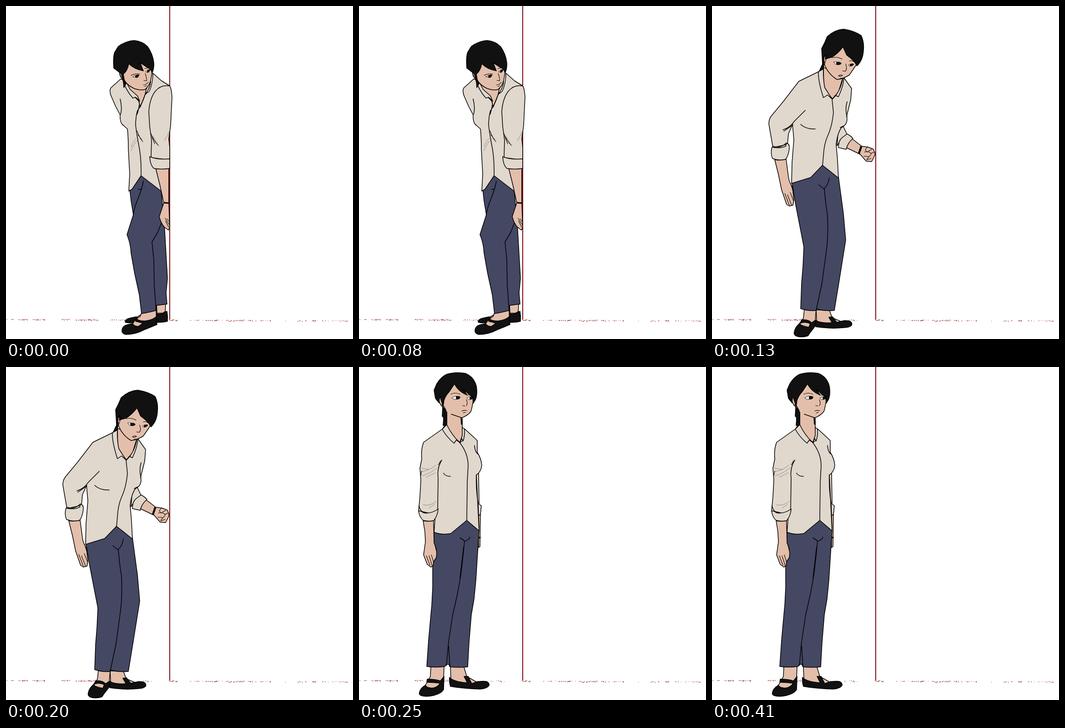
Animation of 763 by 734 pixels, one loop 0.51 s. Source, as an HTML page:

```html
<!DOCTYPE html>
<html lang="en">
<head>
<meta charset="utf-8">
<title>Leaning by the wall</title>
<style>
html, body { margin: 0; width: 100%; height: 100%; overflow: hidden; background: #fff; }
svg { display: block; width: 763px; height: 734px; }
path { stroke: #000; stroke-width: 1.5; stroke-linejoin: round; stroke-linecap: round; }
.shirt { fill: #e0d7cd; }
.pants { fill: #444863; }
.skin { fill: #e3bfab; }
.black { fill: #111; }
.white { fill: #fff; stroke-width: .8; }
.line { fill: none; }
.fine { fill: none; stroke-width: 1.1; }
.faint { fill: none; stroke-width: .6; stroke: #555; }
.band { fill: none; stroke-width: 3.2; stroke-linecap: butt; }
.wall { stroke: #800c12; stroke-width: 2; stroke-linecap: butt; }
#floor { fill: #96191c; stroke: none; }
.pose { visibility: hidden; animation: 510ms step-end infinite; }
#lean { animation-name: lean; }
#rise { animation-name: rise; }
#stand { animation-name: stand; }
@keyframes lean { 0% { visibility: visible; } 25.4902%, 100% { visibility: hidden; } }
@keyframes rise { 0% { visibility: hidden; } 25.4902% { visibility: visible; } 49.0196%, 100% { visibility: hidden; } }
@keyframes stand { 0% { visibility: hidden; } 49.0196%, 100% { visibility: visible; } }
</style>
</head>
<body>
<svg viewBox="0 0 763 734">
  <path id="floor" shape-rendering="crispEdges"/>
  <path class="wall" d="M360 0V691"/>

  <g id="lean" class="pose">
    <!-- feet -->
    <path class="skin" d="M331 657L332 677L350 677L351 656Z"/>
    <path class="black" d="M331 678Q340 681 349 674L354 673Q356 684 355 695Q344 698 331 697Z"/>
    <path class="skin" d="M284 688L296 681L299 688L288 694Z"/>
    <path class="black" d="M262 697Q262 690 272 688L286 685L293 689L284 697Q272 700 262 697Z"/>
    <path class="skin" d="M298 676L295 684L284 692L276 704L300 708L331 695L330 669Z"/>
    <path class="black" d="M255 716Q255 706 265 703L278 700Q282 706 290 707L301 699L285 695L286 689Q294 695 307 694Q323 692 331 684L332 702Q316 709 303 714Q285 724 263 724Q255 722 255 716Z"/>
    <!-- trousers -->
    <path class="pants" d="M272 403L275 430L280 460L266 504Q274 523 275 545L283 590L293 636L298 678Q316 675 330 671L331 660L354 657L352 632L355 600L351 530L348 478L341 405L298 370Z"/>
    <path class="line" d="M302 386Q299 403 291 423Q282 444 280 460M291 404L298 404M298 374Q308 383 316 386M342 478L333 500L321 520L325 560L326 615L330 671"/>
    <!-- shirt -->
    <path class="skin" d="M258 160L274 190L292 210L295 223L306 198L318 160Z"/>
    <path class="shirt" d="M252 161L230 181Q227 188 231 198L241 221L251 240Q250 258 258 263L267 271Q269 290 269 315L272 370L270 408L277 404L297 374L341 408L350 350L360 176L342 165L323 148Q323 170 315 188L306 195L295 223L292 210L274 190L261 163Z"/>
    <path class="shirt" d="M255 158Q262 184 279 203L285 201Q290 205 294 210L289 198L273 184L262 163ZM318 158Q320 177 306 195L308 184L316 168Z"/>
    <path class="line" d="M306 195Q299 217 289 231Q285 245 285 263Q288 286 291 302Q298 333 297 374M251 205Q256 225 252 239M293 218Q291 232 288 239"/>
    <path class="fine" d="M288 275Q293 290 301 299M290 284L298 294"/>
    <path class="faint" d="M275 319Q281 302 293 292M275 310Q280 298 286 292"/>
    <!-- near arm -->
    <path class="skin" d="M329 357L338 393L347 434L337 464Q340 478 348 487L357 494L360 489L358 434V357Z"/>
    <path class="fine" d="M350 468L359 482M351 474L358 488M354 469L359 475M358 360V432"/>
    <path class="band" d="M346 433.500L358.500 434.500"/>
    <path class="shirt" d="M360 176Q341 173 329 187Q316 203 314 233L316 266L320 295L319 334L360 340L360 312L358 293L362 263L365 201Q364 182 360 176Z"/>
    <path class="shirt" d="M316 332Q332 339 360 337L360 358Q342 361 325 358Q317 351 316 332Z"/>
    <path class="fine" d="M318 280Q326 299 335 307M321 288L327 304M360 278L358 295"/>
    <path class="faint" d="M348 297Q355 288 359 276M323 287L336 309"/>
    <!-- head -->
    <path class="skin" d="M249 145Q251 158 259 162Q266 174 280 181Q294 187 306 184Q315 176 318 165L322 142L300 118L262 124Z"/>
    <path class="black" d="M253 149L237 137Q235 112 239 102L247 89Q264 77 282 76Q300 78 311 89Q323 106 325 125Q326 138 321 148Q320 139 312 136L295 125L302 143Q281 139 270 127Q267 143 258 150L260 162L264 171L259 180L258 164Z"/>
    <path class="fine" d="M250 149Q250 157 257 161M275 153Q284 148 294 150M305 138L314 136M306 149Q310 159 309 165L303 164M302 174Q308 174 313 168M305 177L309 176"/>
    <path class="white" d="M279 156Q285 151 293 152Q288 159 279 156ZM307 145Q312 139 317 140Q314 149 307 145Z"/>
    <path class="black" d="M285 154Q290 151 292 153Q289 159 285 157ZM311 143Q314 140 316 141Q314 147 311 146Z"/>
  </g>

  <g id="rise" class="pose">
    <!-- feet -->
    <path class="skin" d="M203 669L201 688L191 702L218 710L227 694L229 669Z"/>
    <path class="black" d="M181 718Q182 709 193 699Q198 710 213 708L216 700Q204 695 194 699L197 692Q211 690 219 698L228 692Q229 705 222 712Q216 719 211 727Q196 732 184 727Q179 723 181 718Z"/>
    <path class="skin" d="M229 670L230 694L252 704L283 695L264 687L258 670Z"/>
    <path class="black" d="M227 693Q241 700 264 698L257 686L265 685L275 698Q287 692 302 694Q309 697 307 704Q301 709 290 709Q260 712 228 707Z"/>
    <!-- trousers -->
    <path class="pants" d="M176 390L184 438L202 531L200 574L197 611L195 667Q213 673 228 671L231 668Q246 673 269 671L279 610L294 516L289 458L278 376L243 350L217 377Z"/>
    <path class="line" d="M247 403Q249 432 254 462Q256 510 251 543L242 610L229 671M235 394L246 403Q256 394 258 379"/>
    <!-- far arm -->
    <path class="skin" d="M306 291L329 309L343 311L354 315Q359 322 358 329L351 343L339 342L326 327L295 312Z"/>
    <path class="fine" d="M342 310L337 317L341 322L351 316M335 322Q343 319 350 325L356 322M350 326L346 332L334 331M345 332L340 339L350 336"/>
    <path class="band" d="M328.500 309L323 325" style="stroke-width:4.200"/>
    <path class="shirt" d="M278 264L289 266L297 283L284 294L275 308Z"/>
    <path class="shirt" d="M297 282Q305 286 310 292Q298 302 295 316L278 312Q278 298 285 291Z"/>
    <!-- shirt -->
    <path class="skin" d="M245 135L246 182L263 206L277 193L289 154Z"/>
    <path class="shirt" d="M234 145L191 166L158 209L130 243Q123 253 126 266L134 312L166 305L168 282L177 261L180 295L176 345L175 391L217 378L243 351L278 379L276 340L273 305Q276 280 284 269L292 263Q299 255 296 243L305 207L307 182L290 158L282 184L265 205L246 182Z"/>
    <path class="shirt" d="M245 138L234 145Q233 165 245 202L254 196L264 205L248 180Q244 160 245 138ZM290 158Q289 177 278 200L271 197L265 205Q283 188 288 158Z"/>
    <path class="line" d="M264 205L267 235Q264 266 254 287Q246 306 245 330L243 352M205 230L181 254Q172 268 156 273M195 261Q207 272 227 271M297 211Q292 229 297 244M178 262L158 276M282 268L290 264"/>
    <path class="shirt" d="M132 311Q148 315 162 309L164 302Q171 304 170 314Q168 330 162 338Q147 342 133 336Q128 325 132 311Z"/>
    <path class="line" d="M134 309Q151 315 163 302"/>
    <!-- near arm -->
    <path class="skin" d="M138 339L146 371L153 405L164 437L170 441L178 439L180 428L177 399Q169 388 168 376L163 338Q150 341 138 339Z"/>
    <path class="fine" d="M160 413L170 439M166 416L175 439M172 411L179 429M173 391L177 405"/>
    <!-- head -->
    <path class="skin" d="M247 108Q243 112 246 126L252 139Q261 154 275 162Q288 161 302 152Q309 142 317 130L313 106L288 80L255 98Z"/>
    <path class="black" d="M242 109L241 94L248 80L253 68Q270 52 290 51Q313 55 328 65Q335 80 333 98Q332 119 319 132L314 124L306 116L296 108L288 90Q276 106 263 113L249 117L250 107Q244 112 247 124L245 139L236 143L243 128Z"/>
    <path class="fine" d="M247 112Q251 107 252 114L248 127M264 114Q275 111 286 117M302 121Q307 119 314 124M294 128Q298 139 293 144L287 143M278 154Q283 150 287 153Q282 156 278 154M281 159L285 159"/>
    <path class="white" d="M268 123Q275 122 284 127Q277 131 271 128ZM300 130Q306 126 312 128Q307 134 302 132Z"/>
    <path class="black" d="M274 124Q282 123 284 127Q279 131 274 128ZM304 129Q309 126 311 129Q307 133 304 132Z"/>
  </g>

  <g id="stand" class="pose">
    <!-- feet -->
    <path class="skin" d="M158 659L157 682L144 705L172 710L186 688L187 659Z"/>
    <path class="black" d="M133 717Q134 709 146 701Q151 710 165 707Q175 704 178 697Q164 695 149 695L150 688Q169 688 179 692L187 682L186 711Q181 720 164 724Q147 728 136 724Q131 721 133 717Z"/>
    <path class="skin" d="M201 659L202 688L222 702L263 697L237 682L230 659Z"/>
    <path class="black" d="M199 684Q208 694 238 696L231 682L240 682L248 698Q262 691 280 693Q287 696 286 702Q281 709 266 710Q230 709 201 704Q198 695 199 684Z"/>
    <!-- far arm -->
    <path class="skin" d="M262 320L267 324L266 396L263 398Z"/>
    <path class="shirt" d="M256 232L263 234L264 302L269 306L267 325L262 328Z"/>
    <path class="band" d="M263 376H267.500"/>
    <!-- trousers -->
    <path class="pants" d="M165 363L162 440L162 486L160 525L158 546L153 602L149 660Q168 663 189 660L192 656L197 655L200 661Q220 663 239 661L242 607L247 546L253 511L257 470L264 360L237 337L202 366Z"/>
    <path class="line" d="M232 384Q229 417 225 450Q220 488 206 546L197 606L192 658M230 397L222 466M197 615L200 660M222 377Q228 379 232 384Q241 382 244 375"/>
    <!-- shirt -->
    <path class="skin" d="M193 90V132L204 152L222 166L228 149L226 108Z"/>
    <path class="shirt" d="M190 127L183 137L142 166Q136 182 138 203L134 223L136 249L134 286L131 317L168 325L165 364Q181 371 202 367L237 338L264 361L262 320L258 238Q268 232 270 217Q269 202 260 188L260 162L232 136L229 161L222 167L204 152Z"/>
    <path class="shirt" d="M193 127L183 137Q193 155 209 168L214 161L221 166Q203 149 193 127ZM227 133L232 137Q233 151 229 163L226 158L222 166L227 151Z"/>
    <path class="line" d="M221 166Q240 190 240 218L238 254L237 338M182 205Q171 224 174 244L173 313M186 234Q190 241 201 241M254 173Q255 188 262 192M258 238Q257 272 262 300L264 355"/>
    <path class="fine" d="M174 216Q178 211 179 207M138 229L136 239"/>
    <path class="faint" d="M137 231Q158 227 169 216M139 240Q158 234 172 222M148 243L168 233M141 304Q158 307 170 296M154 311L166 303M137 223L154 226"/>
    <path class="shirt" d="M131 318Q136 316 141 321Q157 325 174 313Q173 328 164 339Q151 341 141 338Q133 331 131 318Z"/>
    <path class="line" d="M132 306Q134 318 145 322"/>
    <!-- near arm -->
    <path class="skin" d="M141 339L145 364L146 386L142 414L150 435L158 441L163 438L164 429L170 420Q173 403 165 388L164 339Q152 341 141 339Z"/>
    <path class="fine" d="M148 416L156 437M154 416L161 438M159 414L164 430M167 393L170 405"/>
    <!-- head -->
    <path class="black" d="M184 88L193 96V128L185 129L186 112L183 108ZM224 111L227 113V127L225 126Z"/>
    <path class="skin" d="M176 66Q174 79 183 86L187 87L192 98L204 104L226 112Q239 107 246 98Q249 89 251 72L244 48L210 30L184 54Z" style="stroke:none"/>
    <path class="line" d="M203 104L226 112Q239 107 246 98Q249 89 251 74M176 68Q175 80 183 87L187 87L192 97"/>
    <path class="black" d="M176 79L168 69L165 51L171 37Q181 21 193 16Q212 10 234 14Q253 22 258 42Q261 60 256 72L251 80L250 66L245 63L229 49L238 62Q218 54 210 37L198 55Q191 62 187 73L185 88L180 69Q176 65 176 79Z"/>
    <path class="fine" d="M179 71Q184 79 182 85M184 88Q188 91 186 95M202 60Q211 55 222 60M239 62Q245 61 250 65M236 72Q240 80 236 85M228 85L233 86M226 97Q231 95 237 96M229 101L234 100"/>
    <path class="white" d="M204 68Q212 62 222 66Q218 73 209 71ZM237 68Q244 64 251 67Q247 73 241 72Z"/>
    <path class="black" d="M214 65Q221 64 222 67Q219 72 214 70ZM244 67Q249 65 251 68Q247 72 244 71Z"/>
  </g>
</svg>
<script>
// Broken floor line: seeded specks in runs of [start, end, density].
const runs = [
  [0, 6, .5], [10, 18, .4], [28, 48, .6], [56, 87, .35], [122, 145, .6],
  [153, 206, .75], [222, 262, .4], [284, 295, .4], [302, 321, .5],
  [355, 377, .6], [401, 427, .3], [431, 478, .55], [484, 525, .8],
  [527, 550, .4], [558, 586, .25], [614, 618, .5], [632, 660, .25],
  [672, 682, .6], [691, 711, .4], [716, 755, .35]
];
let seed = 17;
const rand = () => (seed = seed * 16807 % 2147483647) / 2147483647;
let specks = "";
for (const [from, to, density] of runs) {
  for (let x = from; x < to; x++) {
    if (rand() > density) continue;
    const y = Math.round(690.5 + x / 220 + (rand() - .5) * 4 * density);
    specks += `M${x} ${y}h1v${rand() < .25 ? 2 : 1}h-1z`;
  }
}
document.getElementById("floor").setAttribute("d", specks);
</script>
</body>
</html>
```
